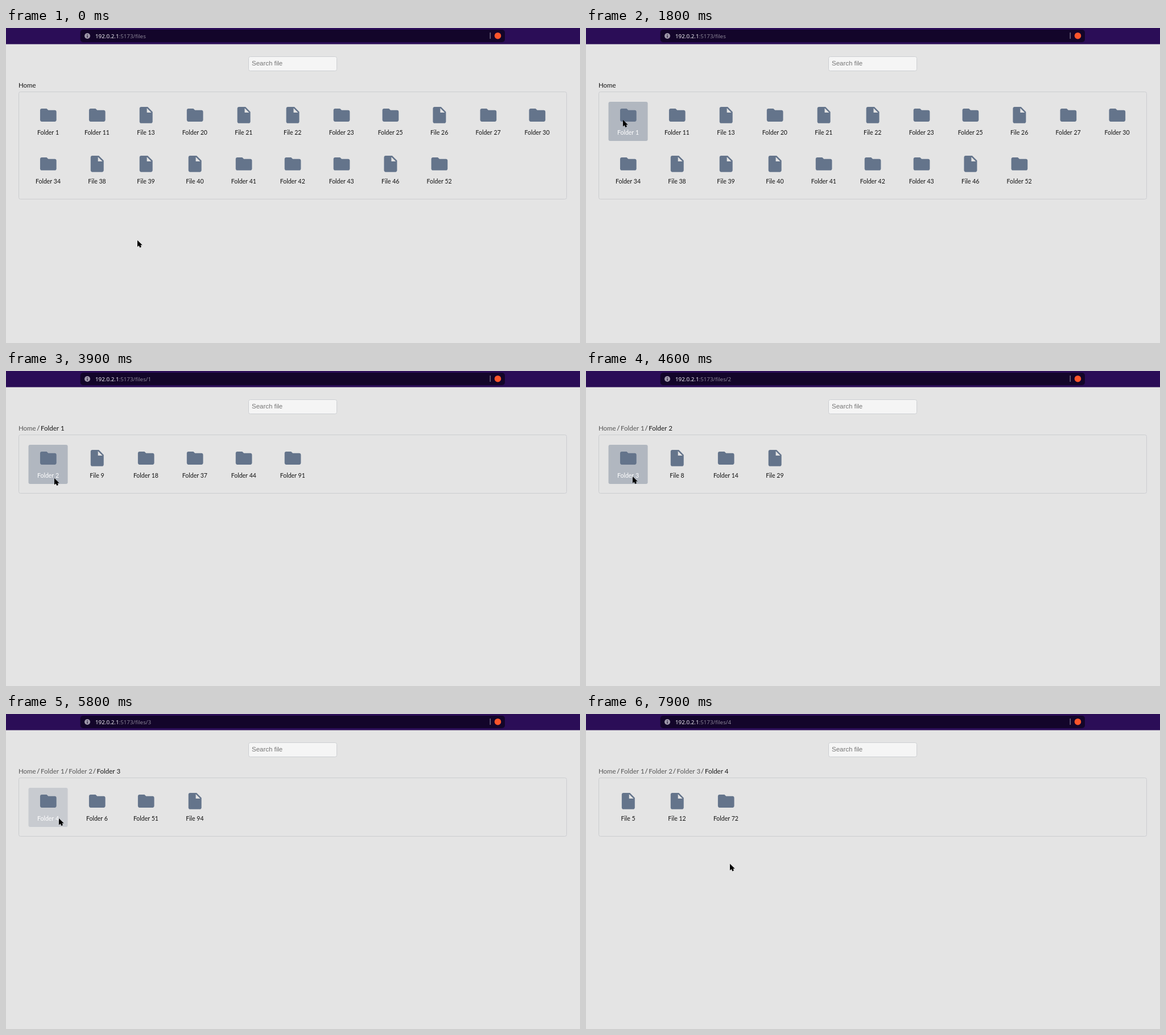
Animation, 1009 px wide and 555 px high, one loop 8 s. Source, as an HTML page with a canvas:

```html
<!DOCTYPE html>
<html lang="en">
<head>
<meta charset="utf-8">
<title>File browser</title>
<style>
html, body { margin: 0; width: 100%; height: 100%; overflow: hidden; background: #e4e4e4; }
canvas { display: block; width: 1009px; height: 555px; }
</style>
</head>
<body>
<canvas id="stage"></canvas>
<script>
const W = 1009, H = 555, LOOP = 8000, STEP = 100;
const COLS = 11, PITCH = 85.95, CELL = 69, LEFT = 39.5, TOP = 130;
const HOVER_FADE = 200, HOVER_SAMPLES = 20, PAGE_FADE = 250;
const LABEL = '10.5px Lato, sans-serif';
const CRUMB = '11.5px Lato, sans-serif';
const ADDRESS = '9.8px "Noto Sans", sans-serif';
const SEARCH = '11.47px "Liberation Sans", sans-serif';

const canvas = document.getElementById('stage');
const ctx = canvas.getContext('2d');
const dpr = window.devicePixelRatio || 1;
canvas.width = W * dpr;
canvas.height = H * dpr;

const icons = {
  Folder: new Path2D('M10 4H4c-1.1 0-2 .9-2 2v12c0 1.1.9 2 2 2h16c1.1 0 2-.9 2-2V8c0-1.1-.9-2-2-2h-8z'),
  File: new Path2D('M6 2c-1.1 0-2 .9-2 2v16c0 1.1.9 2 2 2h12c1.1 0 2-.9 2-2V8l-6-6zm7 7V3.5L18.5 9z')
};
const arrow = new Path2D('M0 0V11.6L2.7 9.2L4.3 12.9L6.9 11.8L5.4 8.6H8.7Z');

// Each page opens at its time; its items are listed by kind and number.
const pages = [
  [0, 'Folder 1,Folder 11,File 13,Folder 20,File 21,File 22,Folder 23,Folder 25,File 26,Folder 27,Folder 30,' +
      'Folder 34,File 38,File 39,File 40,Folder 41,Folder 42,Folder 43,File 46,Folder 52'],
  [2400, 'Folder 2,File 9,Folder 18,Folder 37,Folder 44,Folder 91'],
  [4100, 'Folder 3,File 8,Folder 14,File 29'],
  [5000, 'Folder 4,Folder 6,Folder 51,File 94'],
  [6300, 'File 5,File 12,Folder 72']
].map(([at, names]) => ({ at, items: names.split(',') }));

// Pointer poses: time, x, y. The pointer eases from one to the next.
const poses = [
  [300, 231, 374], [650, 205, 430], [1200, 62, 201], [1800, 65, 162],
  [1950, 65, 162], [2860, 85, 202], [2910, 85, 184], [3100, 83, 180],
  [3700, 83, 177], [4200, 88, 212], [4600, 82, 186], [5350, 91, 248],
  [5870, 93, 181], [6400, 89, 225], [6700, 90, 211], [6900, 104, 229],
  [7300, 190, 182], [7650, 279, 225], [7900, 253, 264]
];

const clamp = v => Math.max(0, Math.min(1, v));
const ease = p => p * p * (3 - 2 * p);
const pageAt = t => Math.max(0, pages.filter(p => p.at <= t).length - 1);

function pointerAt(t) {
  const next = poses.find(p => p[0] >= t) || poses[poses.length - 1];
  const prev = poses[Math.max(0, poses.indexOf(next) - 1)];
  const k = ease(clamp((t - prev[0]) / (next[0] - prev[0] || 1)));
  return { x: prev[1] + (next[1] - prev[1]) * k, y: prev[2] + (next[2] - prev[2]) * k };
}

// Index of the item under the pointer, or -1.
function itemUnder(t) {
  const { x, y } = pointerAt(t);
  const dx = x - LEFT, dy = y - TOP;
  if (dx < 0 || dy < 0 || dx % PITCH > CELL || dy % PITCH > CELL) return -1;
  return Math.floor(dx / PITCH) + COLS * Math.floor(dy / PITCH);
}

// Share of the recent past that the pointer spent on each item: a linear fade in and out.
function hoverLevels(t, page) {
  const levels = {};
  for (let i = 0; i < HOVER_SAMPLES; i++) {
    const past = t - (i + 0.5) * HOVER_FADE / HOVER_SAMPLES;
    if (pageAt(past) !== page) break;
    const item = itemUnder(past);
    levels[item] = (levels[item] || 0) + 1 / HOVER_SAMPLES;
  }
  return levels;
}

function rect(x, y, w, h, fill) {
  ctx.fillStyle = fill;
  ctx.fillRect(x, y, w, h);
}

function box(x, y, w, h, r, fill, stroke) {
  ctx.beginPath();
  ctx.roundRect(x, y, w, h, r);
  if (fill) { ctx.fillStyle = fill; ctx.fill(); }
  if (stroke) { ctx.strokeStyle = stroke; ctx.lineWidth = 1; ctx.stroke(); }
}

function disc(x, y, r, fill) {
  ctx.beginPath();
  ctx.arc(x, y, r, 0, Math.PI * 2);
  ctx.fillStyle = fill;
  ctx.fill();
}

function text(str, x, y, font, fill, align = 'left') {
  ctx.font = font;
  ctx.fillStyle = fill;
  ctx.textAlign = align;
  ctx.fillText(str, x, y);
  return ctx.measureText(str).width;
}

function drawHeader(page) {
  rect(0, 0, W, 28.5, '#2b0d57');
  box(130.6, 3, 746.4, 22, 5, '#13052a');
  disc(143, 14, 5, '#a09aab');
  rect(142.4, 11, 1.2, 1.3, '#13052a');
  rect(142.4, 13.3, 1.2, 3.6, '#13052a');
  const host = text('192.0.2.1', 157, 17.5, ADDRESS, '#f1eff4');
  text(':5173/files' + (page ? '/' + page : ''), 157 + host, 17.5, ADDRESS, '#8a8496');
  rect(850.6, 8, 1.2, 11, '#8b8498');
  disc(864.5, 13.7, 5.8, '#fb542b');
}

function drawSearch() {
  box(426.5, 50.5, 155, 25, 3, '#f5f5f5', '#cdcfd2');
  text('Search file', 432, 66, SEARCH, '#757575');
}

function drawCrumbs(page) {
  for (let i = 0; i <= page; i++) {
    const x = i ? 61 + 49.3 * (i - 1) : 22;
    if (i) text('/', x - 4.2, 105, CRUMB, '#333', 'center');
    text(i ? 'Folder ' + i : 'Home', x, 105, CRUMB, i === page ? '#151515' : '#555');
  }
}

function drawItem(name, i, level, active) {
  const x = LEFT + PITCH * (i % COLS);
  const y = TOP + PITCH * Math.floor(i / COLS);
  const cx = x + CELL / 2;
  if (level) box(x, y, CELL, CELL, 3, `rgba(100,116,139,${0.4 * level})`);

  ctx.save();
  ctx.translate(cx - 16.9, y + 6.2);
  ctx.scale(1.434, 1.434);
  ctx.fillStyle = '#64748b';
  ctx.fill(icons[name.split(' ')[0]], 'evenodd');
  ctx.restore();
  text(name, cx, y + 58, LABEL, active ? '#fff' : '#111', 'center');
}

function draw(t) {
  ctx.setTransform(dpr, 0, 0, dpr, 0, 0);
  rect(0, 0, W, H, '#e4e4e4');

  const page = pageAt(t);
  const { at, items } = pages[page];
  drawHeader(page);
  drawSearch();
  drawCrumbs(page);

  const rows = Math.ceil(items.length / COLS);
  box(22.5, 112.5, 963, 17 + rows * 86, 3, null, '#cccdd0');
  const levels = hoverLevels(t, page);
  const active = itemUnder(t);
  ctx.globalAlpha = page ? clamp((t - at) / PAGE_FADE) : 1;
  items.forEach((name, i) => drawItem(name, i, levels[i], i === active));
  ctx.globalAlpha = 1;

  const { x, y } = pointerAt(t);
  ctx.translate(Math.round(x), Math.round(y));
  ctx.fillStyle = '#000';
  ctx.fill(arrow);
}

const start = performance.now();
function tick() {
  const t = (performance.now() - start) % LOOP;
  draw(Math.floor(t / STEP) * STEP);
  requestAnimationFrame(tick);
}
tick();
</script>
</body>
</html>
```
